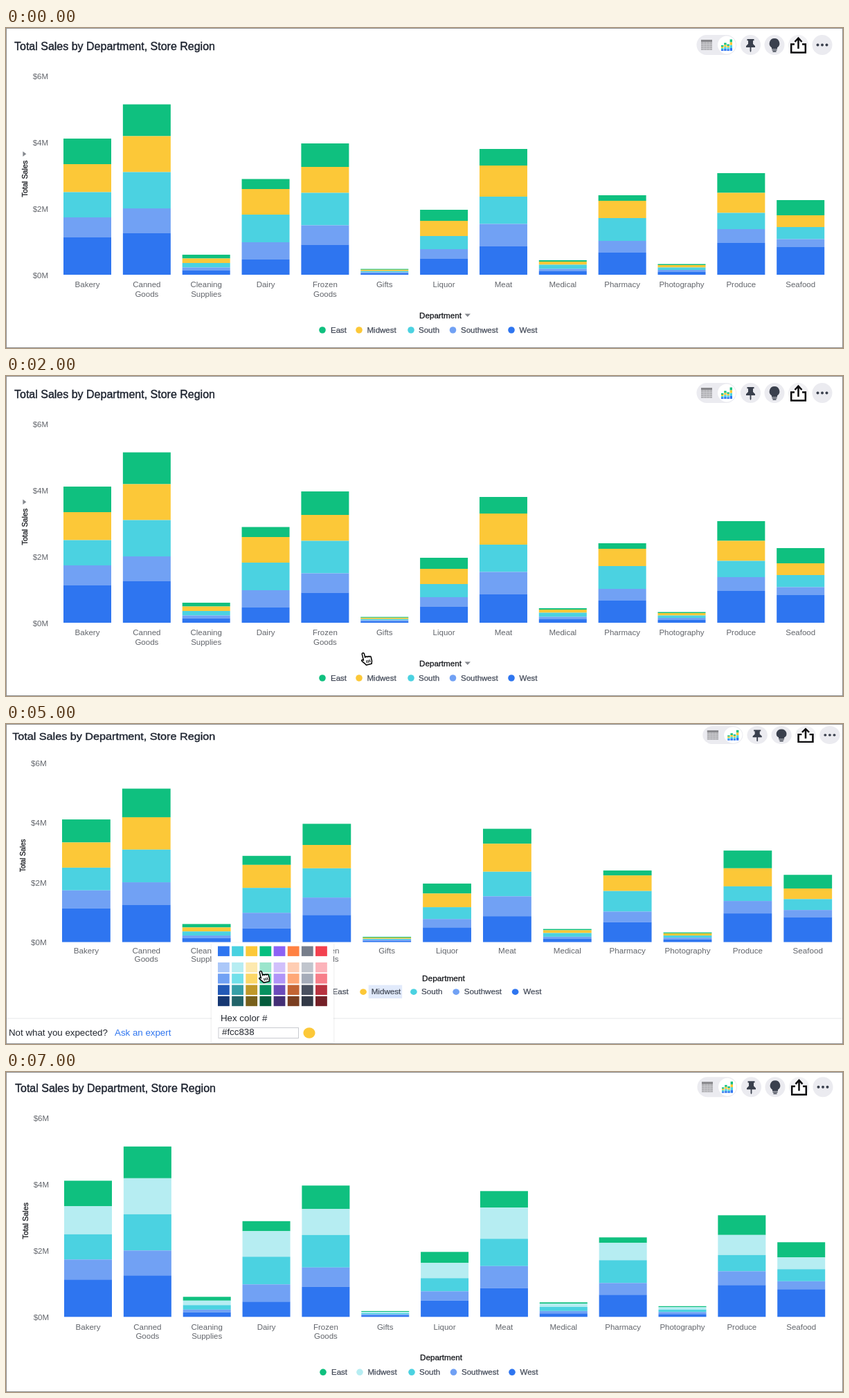
Write an HTML page that moves like this. It is 1209 px wide and 463 px high and loops after 8000 ms.

```html
<!DOCTYPE html>
<html lang="en">
<head>
<meta charset="utf-8">
<title>Stacked sales chart</title>
<style>
html, body { margin: 0; width: 100%; height: 100%; overflow: hidden; background: #fff; }
svg { display: block; width: 100%; height: 100%; font: 11.5px "Liberation Sans", Arial, sans-serif; }
.title { font-size: 16px; fill: #1d232f; stroke: #1d232f; stroke-width: .4px; }
.axis { fill: #16181d; stroke: #16181d; stroke-width: .3px; font-size: 11.7px; }
.tick { fill: #62656b; }
.key { fill: #434a58; stroke: #434a58; stroke-width: .25px; }
.mid { text-anchor: middle; }
.end { text-anchor: end; }
.note { font-size: 13.2px; fill: #22262e; }
.link { fill: #2e75f0; }
</style>
</head>
<body>
<svg id="stage" viewBox="0 0 1209 463"></svg>
<script>
const BASE = 357, BAR_W = 69, PITCH = 85.85;
const GREEN = '#0fc07f', YELLOW = '#fcc838', TEAL = '#4bd2e1', SKY = '#71a1f4', BLUE = '#2e75f0';

// Top edge of each segment: East, Midwest, South, Southwest, West
const bars = [
  ['Bakery', 160, 197, 237.5, 274, 303],
  ['Canned Goods', 110.5, 156.5, 208.5, 261, 297],
  ['Cleaning Supplies', 328, 333.5, 340, 346.5, 350.5],
  ['Dairy', 218.5, 233, 270, 310, 335],
  ['Frozen Goods', 167, 201, 238.5, 285.5, 313.5],
  ['Gifts', 348.6, 349.8, 351.7, 353.3, 354.8],
  ['Liquor', 263, 279, 301, 320, 333.5],
  ['Meat', 175, 199, 244, 283.5, 315.5],
  ['Medical', 336, 338, 342.5, 348.5, 352],
  ['Pharmacy', 242, 250, 275, 308, 325],
  ['Photography', 341.5, 343, 346.5, 350, 353],
  ['Produce', 210, 238.5, 267.5, 291, 311],
  ['Seafood', 249, 271, 288, 305.5, 317]
];

const legend = [
  ['East', 457, 469], ['Midwest', 510, 521.5], ['South', 585, 596],
  ['Southwest', 645.5, 657], ['West', 730, 741.5]
];

const swatches = [
  '2e75f0 48d1e0 fcc838 06bf7f 8c62f5 ff8142 777e8b f3414f',
  'abc8f9 b6edf2 fde9af 9be5cc d1c0fb ffcdb3 c0c5cd fcb3ba',
  '71a1f4 71e0ea fcd767 55d3a8 b095f8 ffa776 a5acb9 f77e89',
  '2359b6 369fa8 c09829 06915f 6b4bba c26333 4a5160 b8323f',
  '163772 22646a 78601b 055c3d 432f75 7a3e20 323946 742027'
].map(row => row.split(' '));
const swatchY = [321.5, 345, 361.2, 377.6, 393.8];

const rect = (x, y, w, h, fill, more = '') =>
  `<rect x="${x}" y="${y}" width="${w}" height="${h}" fill="${fill}" ${more}/>`;
const dot = (x, y, r, fill) => `<circle cx="${x}" cy="${y}" r="${r}" fill="${fill}"/>`;
const text = (x, y, cls, s, more = '') =>
  `<text x="${x}" y="${y}" class="${cls}" ${more}>${s}</text>`;
const path = (d, fill, more = '') => `<path d="${d}" fill="${fill}" ${more}/>`;

function toolbar() {
  const pad = '#ebebf0', ink = '#3a404d';
  let s = rect(997.5, 10, 57.5, 29, pad, 'rx="14.5"') + dot(1041, 24.5, 13, '#fff');
  // table icon
  s += rect(1004, 17, 16, 15, '#b2b2b6') + rect(1004, 17, 16, 3, '#88888c');
  s += path('M1004 23.5h16M1004 26.5h16M1004 29.5h16M1008 20v12M1012 20v12M1016 20v12',
    'none', 'stroke="#d0d0d4" stroke-width=".7"');
  // chart icon
  [[1033, 25], [1037.2, 21.5], [1041.4, 23.5], [1045.6, 16.5]].forEach(([x, top]) => {
    const h = (33 - top) / 4;
    [GREEN, YELLOW, TEAL, BLUE].forEach((c, i) => s += rect(x, top + h * i, 3.4, h, c));
  });
  [1075.5, 1110, 1144.5, 1179].forEach((x, i) => s += dot(x, 24.5, 14.5, i === 2 ? '#f1f1f4' : pad));
  // pin
  s += path('M1070.5 16h10v2.2h-1.5v4.8l3 3v2h-5.6v5.5l-.9 1.5-.9-1.5V28h-5.6v-2l3-3v-4.800h-1.5z', ink);
  // bulb
  s += path('M1110 15a7.300 7.300 0 0 1 4 13.400v2.100h-8v-2.100a7.300 7.300 0 0 1 4-13.400z', ink);
  s += rect(1106.5, 31.3, 7, 1.3, ink) + rect(1107.5, 33.3, 5, 1.5, ink);
  // share
  s += rect(1134.500, 22.5, 20, 13, '#fff');
  s += path('M1139 23.500h-4.800v12h20.600v-12h-4.800M1144.500 30V16M1139.500 20l5-5.500 5 5.500',
    'none', 'stroke="#0c0c0e" stroke-width="2.5"');
  [1172.5, 1179, 1185.5].forEach(x => s += dot(x, 24.5, 2, ink));
  return s;
}

function chart({ midwest = YELLOW, sort, hover, nudge = 0 }) {
  const fills = [GREEN, midwest, TEAL, SKY, BLUE];
  let s = text(12, 31.8, 'title', 'Total Sales by Department, Store Region') + toolbar();
  for (let i = 0; i < 4; i++) s += text(61, 74 + 96 * i, 'tick end', `$${6 - 2 * i}M`);
  s += text(0, 0, 'axis mid', 'Total Sales', 'transform="translate(31 218) rotate(-90)" style="font-size:10.8px"');

  bars.forEach(([name, ...tops], i) => {
    const x = 83 + PITCH * i;
    tops.forEach((y, k) => s += rect(x, y, BAR_W, (tops[k + 1] || BASE) - y, fills[k]));
    name.split(' ').forEach((word, k) =>
      s += text(x + BAR_W / 2, 375.3 + 13.4 * k, 'tick mid', word));
  });

  s += text(597, 419.6, 'axis', 'Department');
  if (sort) s += path('M24.300 178.500l5 3.800-5 3.800z', '#85888e') + path('M662.500 413.500h8.500l-4.250 4.500z', '#85888e');

  legend.forEach(([name, cx, tx], i) => {
    const dx = i === 1 ? nudge : 0;
    if (i === 1 && hover) s += rect(517.5 + dx, 426, 48, 21.5, '#e1eafb');
    s += dot(cx + dx, 437, 4.8, fills[i]) + text(tx + dx, 440.6, 'key', name);
  });
  return s;
}

function picker() {
  const flat = (x, y, cls, s) => text(0, 0, cls, s, `transform="translate(${x} ${y}) scale(1.01 .9)"`);
  let s = rect(1, 425.5, 1207, 1, '#e6e7ea');
  s += flat(4, 451, 'note', 'Not what you expected?') + flat(157, 451, 'note link', 'Ask an expert');
  s += rect(297, 316.5, 176, 145, '#fff', 'style="filter:drop-shadow(0 1px 1.5px #0002)"');
  swatches.forEach((row, r) => row.forEach((c, i) =>
    s += rect(306 + 20.15 * i, swatchY[r], 16.8, 14.4, '#' + c)));
  s += flat(310, 430, 'note', 'Hex color #');
  s += rect(307, 439.5, 115.5, 15, '#fff', 'stroke="#c9cbd0"');
  s += flat(312, 450.3, 'note', '#fcc838');
  s += `<ellipse cx="438" cy="447" rx="8.600" ry="7.700" fill="${YELLOW}"/>`;
  return s;
}

const hand = `<g transform="rotate(-14 9 10)">` +
  path('M5 11V2.500a1.600 1.600 0 0 1 3.200 0V8a1.500 1.500 0 0 1 2.900.2 1.500 1.500 0 0 1 2.800.5 1.400 1.400 0 0 1 2.600.9V14.500c0 2-1 2.500-1.200 4.500H7c-.5-2-3-4.500-4.600-7-.8-1.600 1-2.400 2.600-.5z',
    '#fff', 'stroke="#000" stroke-width="1.5" stroke-linejoin="round"') +
  path('M9 12.500v4M11.300 12.500v4M13.600 12.500v4', 'none', 'stroke="#000" stroke-width="1.100"') + '</g>';

const views = [
  ['1 0 0 1 0 0', { sort: true }],
  ['.9977 0 0 .9696 2.2 5.35', { hover: true }],
  ['1.0118 0 0 .9006 -3 -6', { hover: true, nudge: 3 }, picker],
  ['1 0 0 1 1 -2.7', { midwest: '#b6edf2' }]
];

const stage = document.getElementById('stage');
stage.innerHTML = views.map(([m, opts, extra]) =>
  `<g class="view"><g transform="matrix(${m})">${chart(opts)}</g>${extra ? extra() : ''}</g>`).join('') +
  rect(.5, .5, 1208, 462, 'none', 'stroke="#8f8f8f"') + `<g id="cursor">${hand}</g>`;

// One step per second: view, then cursor x, y and vertical scale
const steps = [
  [0],
  [0, 442, 83, 1],
  [0, 511, 399, 1],
  [1, 504, 432, 1],
  [2, 512, 390, .95],
  [2, 363, 356, .95],
  [2, 325, 351, .95],
  [3]
];
const groups = [...stage.querySelectorAll('.view')];
const cursor = document.getElementById('cursor');
const start = performance.now();
let shown = -1;

function draw() {
  const n = Math.floor(Math.max(0, performance.now() - start) / 1000) % steps.length;
  if (n !== shown) {
    const [view, x, y, sy] = steps[n];
    groups.forEach((g, i) => g.style.display = i === view ? '' : 'none');
    cursor.style.display = x ? '' : 'none';
    if (x) cursor.setAttribute('transform', `translate(${x} ${y}) scale(1 ${sy})`);
    shown = n;
  }
  requestAnimationFrame(draw);
}
draw();
</script>
</body>
</html>
```
